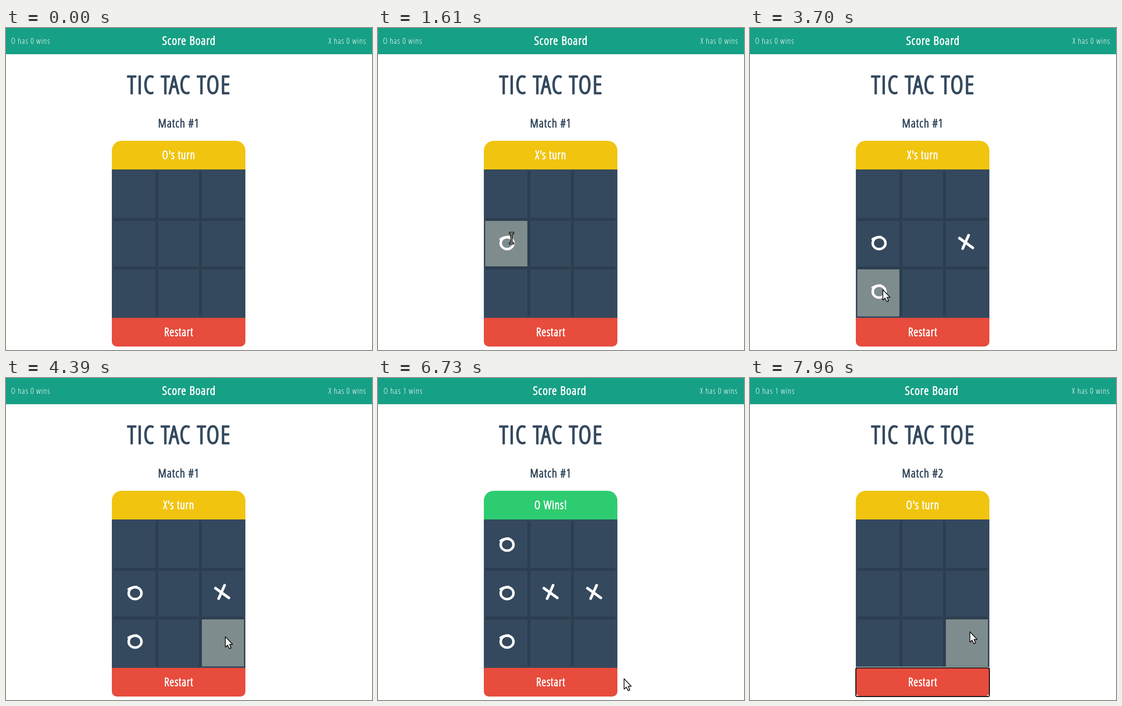
Write an HTML page with a canvas that moves like this. It is 740 by 651 pixels and loops after 8000 ms.

```html
<!DOCTYPE html>
<html lang="en">
<head>
<meta charset="utf-8">
<title>Tic Tac Toe</title>
<style>
  html, body { margin: 0; width: 100%; height: 100%; overflow: hidden; background: #fff; }
  canvas { display: block; }
</style>
</head>
<body>
<canvas id="stage" width="740" height="651"></canvas>
<script>
const ctx = document.getElementById('stage').getContext('2d');
const LOOP = 8000;
const RESTART = 7340;
const NAVY = '#34495e';
const GRID = { x: 217, y: 289, w: 88, h: 98, line: 6 };

// Each stop is travelled to between two times and may end in a click.
const stop = (from, to, x, y, click) => ({ from, to, x, y, click });
const stops = [
  stop(0, 0, 330, 610),
  stop(440, 980, 270, 425, 1210),
  stop(1610, 1990, 424, 442, 2620),
  stop(2620, 2780, 361, 506),
  stop(3320, 3620, 268, 528, 3700),
  stop(3780, 4240, 443, 522),
  stop(4390, 4630, 352, 436, 4700),
  stop(4780, 5160, 307, 530),
  stop(5480, 5630, 268, 335, 5860),
  stop(5860, 6180, 497, 607),
  stop(6730, 7020, 400, 626),
  stop(7340, 7650, 590, 555),
  stop(7650, 7960, 444, 512)
];

function cellAt({ x, y }) {
  const col = Math.floor((x - GRID.x) / GRID.w);
  const row = Math.floor((y - GRID.y) / GRID.h);
  return Math.min(col, row) >= 0 && Math.max(col, row) < 3 ? { col, row } : null;
}

const turns = stops.filter(s => s.click).map(s => ({ time: s.click, ...cellAt(s) }));

function pointerAt(t) {
  const i = stops.findLastIndex(s => s.from <= t);
  if (i < 1) return null;
  const a = stops[i - 1], b = stops[i];
  const u = Math.min(1, (t - b.from) / (b.to - b.from));
  const e = u * u * (3 - 2 * u);
  return { x: a.x + (b.x - a.x) * e, y: a.y + (b.y - a.y) * e, moving: u < 1 };
}

function rect(color, x, y, w, h, radii = 0) {
  ctx.fillStyle = color;
  ctx.beginPath();
  ctx.roundRect(x, y, w, h, radii);
  ctx.fill();
}

function text(str, x, y, size, color, align = 'center') {
  ctx.font = `300 condensed ${size}px 'Open Sans', 'Noto Sans', sans-serif`;
  ctx.letterSpacing = size * 0.05 + 'px';
  ctx.textAlign = align;
  ctx.fillStyle = color;
  ctx.fillText(str, x, y);
}

// A round outline makes the light face heavier and softens its corners.
function heading(str, x, y, size, color) {
  text(str, x, y, size, color);
  ctx.strokeStyle = color;
  ctx.lineWidth = size * 0.05;
  ctx.lineJoin = 'round';
  ctx.strokeText(str, x, y);
}

function polyline(points, close) {
  ctx.beginPath();
  points.forEach(([x, y]) => ctx.lineTo(x, y));
  if (close) ctx.closePath();
}

function at(x, y, draw) {
  ctx.save();
  ctx.translate(x, y);
  ctx.lineCap = ctx.lineJoin = 'round';
  draw();
  ctx.restore();
}

function drawO() {
  ctx.strokeStyle = '#fff';
  ctx.lineWidth = 5;
  ctx.beginPath();
  ctx.ellipse(0, 0, 13, 12, 0, 0, Math.PI * 2);
  ctx.moveTo(-13, -8);
  ctx.quadraticCurveTo(-6, -12.5, 3, -12.5);
  ctx.stroke();
}

function drawX() {
  ctx.strokeStyle = '#fff';
  ctx.lineWidth = 5.5;
  polyline([[5, -16], [-7, 11]]);
  ctx.stroke();
  polyline([[-13.5, -10], [13.5, 9.5]]);
  ctx.stroke();
}

function drawArrow() {
  polyline([[0.5, 1], [0.5, 22], [5, 18], [8.5, 25], [12, 23.5], [9, 16.5], [15, 16.2]], true);
  ctx.shadowColor = 'rgba(0,0,0,.35)';
  ctx.shadowBlur = 2;
  ctx.shadowOffsetX = ctx.shadowOffsetY = 1;
  ctx.fillStyle = '#f2f2f2';
  ctx.fill();
  ctx.shadowColor = 'transparent';
  ctx.strokeStyle = '#0c0c0c';
  ctx.lineWidth = 1.5;
  ctx.stroke();
}

function drawBeam() {
  ctx.lineCap = 'square';
  for (const [color, width] of [['#111', 4.5], ['#aaa', 1.5]]) {
    ctx.strokeStyle = color;
    ctx.lineWidth = width;
    ctx.beginPath();
    for (const y of [-10.5, 10.5]) {
      ctx.moveTo(-3, y);
      ctx.lineTo(3, y);
    }
    ctx.moveTo(0, -10.5);
    ctx.lineTo(0, 10.5);
    ctx.stroke();
  }
}

function drawHeader(won) {
  const shift = won ? 1 : 0;
  rect('#16a085', 0, 0, 740, 53);
  text(`O has ${shift} wins`, 10 + shift, 32, 17, '#fff', 'left');
  heading('Score Board', 370 - 2.5 * shift, 34, 24.5, '#fff');
  text('X has 0 wins', 728.5 - shift, 32, 17, '#fff', 'right');
}

function drawBoard(pointer) {
  const { x, y, w, h, line } = GRID;
  rect(NAVY, x - 3, y - 3, 3 * w + 6, 3 * h + 6);
  const cell = pointer && cellAt(pointer);
  if (cell) rect('#7f8c8d', x + w * cell.col, y + h * cell.row, w, h);
  for (const i of [1, 2]) {
    rect('#2c3e50', x + w * i - line / 2, y, line, 3 * h);
    rect('#2c3e50', x, y + h * i - line / 2, 3 * w, line);
  }
}

function drawButton(focused) {
  if (focused) rect('#fff', 212, 584, 274, 62, 5);
  rect('#e74c3c', 214, 586, 270, 58, [0, 0, 10, 10]);
  if (focused) {
    ctx.strokeStyle = '#101010';
    ctx.lineWidth = 2;
    ctx.beginPath();
    ctx.roundRect(214, 586, 270, 58, 3);
    ctx.stroke();
  }
  heading('Restart', 349.5, 623, 23, '#fff');
}

function drawScene(t) {
  const again = t >= RESTART;
  const done = turns.filter(turn => turn.time <= t);
  const won = done.length === turns.length;
  const played = again ? [] : done;
  const pointer = pointerAt(t);

  rect('#fff', 0, 0, 740, 651);
  drawHeader(won);
  heading('TIC TAC TOE', 350.5, 133, 50, NAVY);
  heading('Match #' + (again ? 2 : 1), 349.5, 201, 24.5, NAVY);

  const green = won && !again;
  rect(green ? '#2ecc71' : '#f1c40f', 214, 228, 270, 58, [20, 20, 0, 0]);
  const status = green ? 'O Wins!' : (played.length % 2 ? 'X' : 'O') + "'s turn";
  heading(status, 349.5, 265, 23, '#fff');

  drawBoard(pointer);
  drawButton(again);
  let overMark = false;
  played.forEach(({ col, row }, i) => {
    const x = GRID.x + GRID.w * (col + 0.5);
    const y = GRID.y + GRID.h * (row + 0.5) - 1;
    at(x, y, i % 2 ? drawX : drawO);
    if (pointer && Math.hypot(pointer.x - x, pointer.y - y) < 17) overMark = true;
  });
  if (pointer) at(pointer.x, pointer.y, overMark && pointer.moving ? drawBeam : drawArrow);
}

function tick() {
  drawScene(performance.now() % LOOP);
  requestAnimationFrame(tick);
}
tick();
</script>
</body>
</html>
```
